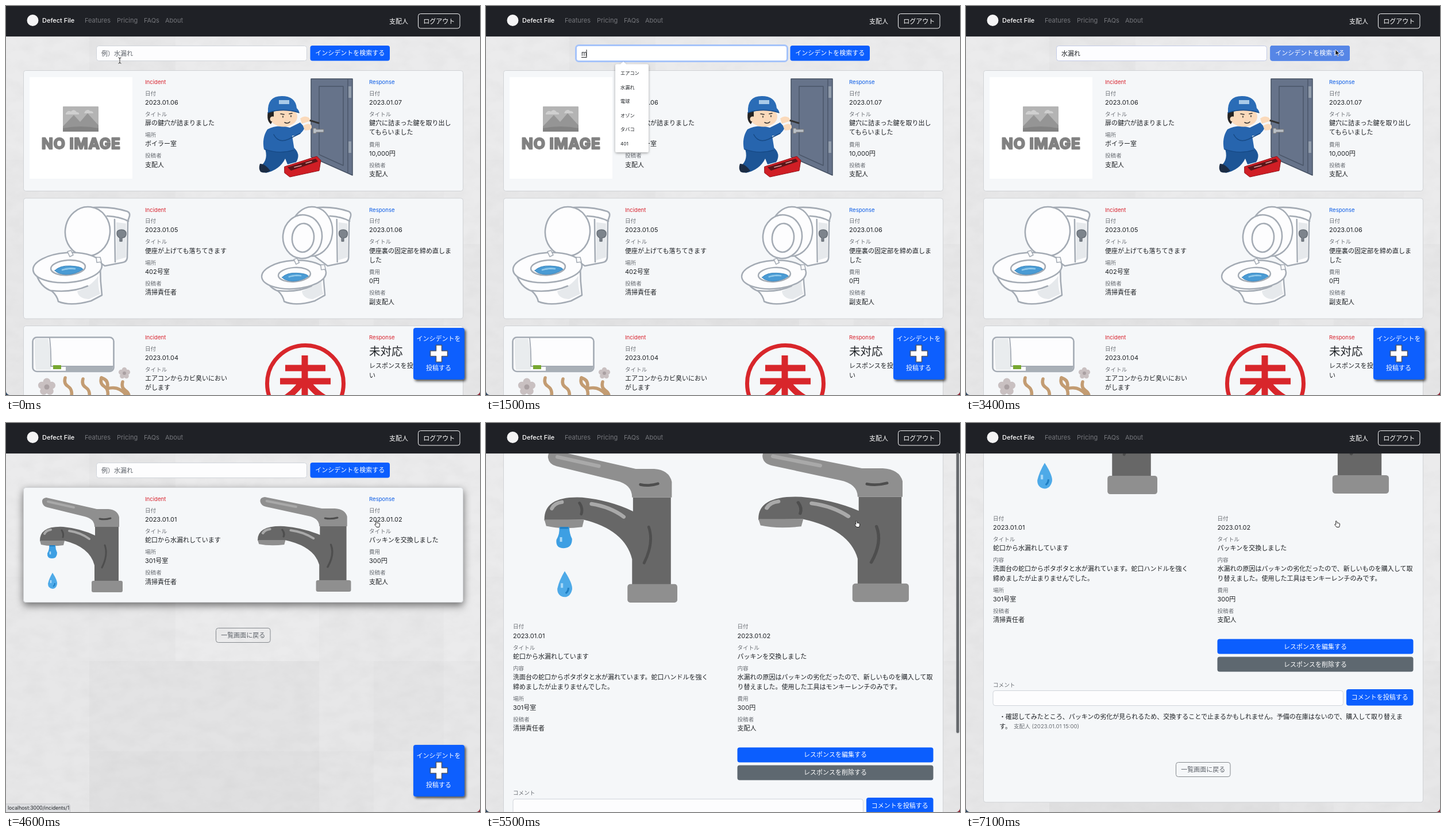
Write an HTML page that moves like this. It is 825 by 678 pixels and loops after 7200 ms.

```html
<!DOCTYPE html>
<html lang="ja">
<head>
<meta charset="utf-8">
<title>Defect File</title>
<style>
@property --s { syntax: '<number>'; inherits: true; initial-value: 0; }
html, body { margin: 0; height: 100%; overflow: hidden; background: #e6e6e7; }
svg { position: absolute; left: 0; top: 0; width: 825px; height: 678px; }
#bg { will-change: transform; }
text { font: 11px Inter, "Noto Sans CJK JP", "Noto Sans CJK", sans-serif; fill: #1d2024; white-space: pre; }
.lab { font-size: 9.6px; fill: #6a6e74; }
.red { font-size: 9.6px; fill: #d8232e; }
.blue { font-size: 9.6px; fill: #0b5ce6; }
.big { font-size: 19.5px; }
.opt { font-size: 8.2px; }
.ph { fill: #5c6168; }
.nav { fill: #74767b; }
.w { fill: #fff; font-weight: 500; }
.mid { text-anchor: middle; }
.card { fill: #f5f7f9; stroke: #d0d2d5; }
.field { fill: #fdfdfe; stroke: #d0d4da; }
.btn { fill: #0b5efe; }
.grey { fill: #5e6870; }
.line { fill: none; stroke: #85898e; }
.art { stroke-linecap: round; stroke-linejoin: round; }
.china { fill: #fdfdfe; stroke: #a4abb4; stroke-width: 2.6; }
.none { font-size: 26px; font-weight: 700; letter-spacing: .8px; fill: #828282; stroke: #828282; stroke-width: 2.4; stroke-linejoin: round; }

#ui { animation: scroll 7.2s infinite; }
#detail { transform: translateY(calc((260 - var(--s)) * 1px)); }
#bar { transform: translateY(calc(var(--s) * .723px)); animation: bar 7.2s linear infinite; }
#lift { filter: drop-shadow(0 5px 7px #0008); animation: lift 7.2s linear infinite; }
#pointer { animation: move 7.2s infinite; }
@keyframes scroll {
  0%, 72.9% { --s: 0; animation-timing-function: cubic-bezier(.5, 0, .8, .6); }
  76.39% { --s: 70.5; animation-timing-function: cubic-bezier(.3, .4, .6, .95); }
  81.94% { --s: 256; animation-timing-function: ease-out; }
  84.7%, 100% { --s: 260; }
}
@keyframes bar {
  0%, 72.5% { opacity: 0; }
  73.5%, 93% { opacity: 1; }
  96%, 100% { opacity: 0; }
}
@keyframes lift {
  0%, 54.8% { opacity: 0; }
  58.5%, 100% { opacity: 1; }
}
@keyframes move {
  0%, 3% { transform: translate(198px, 95px); }
  8.5%, 39.6% { transform: translate(198px, 84px); }
  45%, 52% { transform: translate(643px, 76px); }
  56.5%, 100% { transform: translate(642px, 170px); }
}
</style>
</head>
<body>
<svg id="bg" viewBox="0 0 825 678">
  <filter id="grain" x="0" y="0" width="100%" height="100%">
    <feTurbulence type="fractalNoise" baseFrequency=".03 .05" numOctaves="4" seed="4"/>
    <feColorMatrix values="0 0 0 0 .2  0 0 0 0 .2  0 0 0 0 .2  .09 0 0 0 -.03"/>
  </filter>
  <rect width="825" height="678" fill="#ebebec"/>
  <g fill="#000">
    <path d="M145 53h150v362h-150z" opacity=".015"/>
    <path d="M0 268h145v147h-145zM545 268h95v147h-95z" opacity=".01"/>
    <path d="M0 415h825v263h-825z" opacity=".014"/>
    <path d="M145 415h400v263h-400z" opacity=".016"/>
    <path d="M145 572h495v106h-495zM640 320h122v252h-122z" opacity=".01"/>
  </g>
  <rect width="825" height="678" filter="url(#grain)"/>
</svg>

<svg id="ui" viewBox="0 0 825 678">
  <defs>
    <filter id="soft" x="-30%" y="-30%" width="170%" height="170%">
      <feDropShadow dx="2.5" dy="3" stdDeviation="2" flood-opacity=".65"/>
    </filter>
    <filter id="pop" x="-30%" y="-10%" width="160%" height="125%">
      <feDropShadow dx="0" dy="1.5" stdDeviation="2" flood-opacity=".35"/>
    </filter>

    <g id="tap" class="art" fill="none">
      <path fill="#676767" d="M59 206Q58 179 100 181Q130 184 155 196V181H196V276H154V248Q146 216 101 205Z"/>
      <path fill="#8f8f8f" d="M59 205H102L100 213Q78 216 61 212ZM70 130Q62 131 63 138Q64 145 72 147L137 163Q154 167 154 181H197V164Q194 151 178 150H158Z"/>
      <rect x="149" y="275" width="54" height="20" rx="3" fill="#8f8f8f"/>
      <path stroke="#a9a9a9" stroke-width="4" d="M73 137L118 147M110 188Q130 191 145 202M67 193Q70 187 78 186"/>
      <path stroke="#4e4e4e" stroke-width="3" d="M163 167Q172 169 182 166M97 187Q101 193 99 199M172 213Q178 230 167 252"/>
    </g>
    <g id="drops">
      <path fill="#3d9fe3" d="M75 213H86Q86 220 89 226Q89 236 80 236Q71 236 72 227Q76 220 75 213Z"/>
      <path fill="#4eaae8" d="M81 261Q90 275 89 281Q87 289 81 289Q73 288 73 280Q75 271 81 261Z"/>
      <path fill="none" stroke="#a7d8f8" stroke-width="2.5" d="M77 224v5M78 274v5"/>
      <path fill="none" stroke="#1f7fc4" stroke-width="2" d="M76 214h9M85 279q0 4-3 6"/>
    </g>

    <g id="pan" class="art china">
      <path d="M143 352Q180 348 211 358Q216 360 215 366L212 375L211 439Q210 446 203 447L172 453L148 436Z"/>
      <path fill="none" d="M176 366Q197 367 213 375M189 372L190 446"/>
      <path fill="#e6e9ec" stroke="none" d="M192 377L209 379V438L192 443Z"/>
      <path fill="#7d848c" stroke="#656c74" d="M201 390q8 0 8 7t-7 7v6h-4v-6q-5-2-5-8t8-6Z" stroke-width="1.4"/>
      <ellipse cx="142" cy="393" rx="39" ry="43" transform="rotate(7 142 393)"/>
      <path d="M53 468Q60 490 80 497Q89 505 91 515Q112 524 148 514L167 504Q164 480 164 455Z"/>
      <path fill="#e6e9ec" stroke="none" d="M124 497Q148 489 161 470Q159 487 164 502L144 511Q126 510 124 497Z"/>
      <path fill="none" d="M79 496Q115 500 142 488"/>
    </g>
    <g id="bowl" class="art china">
      <ellipse cx="107" cy="456" rx="60" ry="26" transform="rotate(-4 107 456)"/>
      <ellipse cx="108" cy="456" rx="30" ry="13" transform="rotate(-4 108 456)"/>
      <path fill="#4a9bd4" stroke="#3b86bd" stroke-width="1" d="M85 461Q94 452 112 453Q132 454 134 459Q121 468 104 468Q90 467 85 461Z"/>
      <path stroke="#8fc8ea" d="M98 460q10-4 22-2"/>
      <path d="M107 428l6-2 4 8-6 3ZM157 438l7 0 2 8-8 1Z" stroke-width="1.6"/>
    </g>
  </defs>

  <g id="list" data-on="0-3650"></g>
  <g id="result" data-on="3650-5000"></g>
  <g data-on="5000-7200"><g id="detail"></g></g>
  <g id="top"></g>
  <rect id="bar" x="818.5" width="5" height="489" rx="2.5" fill="#65686c"/>
  <path fill="#27405c" d="M0 672Q1 677 6 678H0Z"/>
  <path fill="#8c2433" d="M825 672Q824 677 819 678H825Z"/>
  <g data-on="4150-5000">
    <path fill="#dcdde0" stroke="#c4c5c8" d="M-1 664H108Q111.500 664 111.500 668V679H-1Z"/>
    <text x="3" y="674" style="font-size:8.6px">localhost:3000/incidents/1</text>
  </g>

  <g id="pointer">
    <path data-on="0-1400 2850-3100" fill="none" stroke="#fff" stroke-width="2.4" d="M-2-5L0-4L2-5M0-4V4M-2 5L0 4L2 5"/>
    <path data-on="0-1400 2850-3100" fill="none" stroke="#222" d="M-2.500-5Q0-5 0-3.500Q0-5 2.500-5M0-4V4M-2.500 5Q0 5 0 3.500Q0 5 2.500 5"/>
    <path data-on="3350-3960" fill="#111" stroke="#fff" stroke-width=".8" d="M0 0V10L2.400 8L4 11.500L5.600 10.800L4 7.300H7.200Z"/>
    <path data-on="3100-3350 3960-7200" fill="#fff" stroke="#222" stroke-width="1" stroke-linejoin="round" d="M1.500 1Q2.700 0 3.300 1.500L4.200 4.200Q7.500 4 8.500 5.500Q9 8 7.500 11.500H3Q1.500 9 -.5 7Q.2 5.600 2 6.700Z"/>
  </g>
</svg>

<script>
const LOOP = 7200, $ = id => document.getElementById(id);
const text = (x, y, s, cls = '') => `<text x="${x}" y="${y}" class="${cls}">${s}</text>`;
const box = (x, y, w, h, cls, rx = 4) => `<rect x="${x}" y="${y}" width="${w}" height="${h}" rx="${rx}" class="${cls}"/>`;
const button = (x, y, w, h, s, cls = 'btn', ink = 'w') =>
  box(x, y, w, h, cls) + text(x + w / 2, y + h / 2 + 4, s, ink + ' mid');
const backButton = y => button(365.5, y, 94.5, 25, '一覧画面に戻る', 'line', 'ph');
const use = (id, m = '') => `<use href="#${id}" transform="${m}"/>`;
const card = (y, h) => box(30.5, y, 765, h, 'card');

// Stacked label/value pairs; y is the middle of the first label
function fields(x, y, rows) {
  return rows.map(([label, ...lines]) => {
    let out = text(x, y + 3.5, label, 'lab');
    lines.forEach((s, i) => out += text(x, y + 19.7 + i * 16.4, s));
    y += 36.3 + (lines.length - 1) * 16.4;
    return out;
  }).join('');
}
const incident = (y, date, title, place, by) => text(242, y + 24, 'Incident', 'red') +
  fields(242, y + 40, [['日付', date], ['タイトル', ...title], ['場所', place], ['投稿者', by]]);
const response = (y, date, title, cost, by) => text(632, y + 24, 'Response', 'blue') +
  fields(632, y + 40, [['日付', date], ['タイトル', ...title], ['費用', cost], ['投稿者', by]]);

const noImage = `<path fill="#fff" d="M41 124H220V301H41Z"/>
  <rect x="99" y="175" width="62" height="44" rx="1" fill="#b4b4b4"/>
  <path fill="#cfcfcf" d="M104 187q4-6 9-3q5-6 10 1q5 0 4 4h-23ZM138 183q5-4 8 0q6 0 6 4h-16Z"/>
  <path fill="#959595" d="M99 210L118 190L129 202L142 187L161 208V219H99Z"/>
  <path fill="#838383" d="M99 213Q130 207 161 213V219H99Z"/>` + text(130.8, 249, 'NO IMAGE', 'none mid');

const worker = `<g class="art">
  <path fill="#66738a" stroke="#465163" stroke-width="1.500" d="M531 127H603V295L531 263Z"/>
  <path fill="none" stroke="#4b576a" stroke-width="1.500" d="M545 140H587V278L545 259ZM595 128V290"/>
  <path fill="#929dac" d="M596 140h5v20h-5ZM596 236h5v20h-5Z"/>
  <path fill="#b9bfc6" stroke="#777" d="M535 213h5v2h13v5h-13v2h-5Z"/>
  <path fill="#1d5596" d="M450 246H500Q514 258 505 272L490 276L486 266Q476 286 452 291L443 279Q458 268 450 246Z"/>
  <path fill="#1b2c44" d="M442 275Q450 274 460 287Q452 293 443 289Q439 283 442 275Z"/>
  <path fill="#2765ae" d="M455 215Q473 206 494 212L512 203L520 212Q513 227 498 226L502 251Q475 260 449 250Q445 230 455 215Z"/>
  <path fill="none" stroke="#174a86" stroke-width="1.500" d="M466 224Q474 240 492 232L512 222M451 250Q476 259 501 251"/>
  <ellipse cx="483" cy="193" rx="24" ry="17.500" fill="#fbdabb"/>
  <path fill="#252322" d="M456 184Q453 200 461 206L466 196V184Z"/>
  <circle cx="464" cy="197" r="4.500" fill="#fbdabb"/>
  <path fill="#2a6cb6" d="M456 186Q454 157 480 157Q504 157 506 178Q511 183 510 186Q482 178 456 186Z"/>
  <path fill="none" stroke="#174a86" stroke-width="1.500" d="M456 186Q482 177 510 186"/>
  <path fill="#a8cae8" d="M475 164h18v7h-18Z"/>
  <path fill="none" stroke="#333" stroke-width="1.600" d="M478 188l6 1M493 188l5-1M482 192v2M496 191v2M485 203q5 3 9-1"/>
  <path stroke="#333" stroke-width="3" d="M524 198L544 204"/>
  <path fill="#fbdabb" d="M512 196q7-6 14-2q5 3 2 7l-13 4ZM517 209q8-6 14-2q3 5-2 9l-9 1Z"/>
  <path fill="#d01e25" stroke="#951219" d="M485 280L541 262L548 269L545 287L494 298L485 291Z"/>
  <path fill="#5b1518" d="M490 281L539 266L543 271L496 287Z"/>
  <path stroke="#d9a5a5" stroke-width="1.500" d="M502 281l12-3M522 274l10-3"/></g>`;

const puff = (x, y, r) => [0, 1, 2, 3, 4].map(i =>
  `<circle cx="${x + r * Math.sin(i * 1.257)}" cy="${y - r * Math.cos(i * 1.257)}" r="${r * .72}"/>`).join('');
const cooler = `<g class="art">
  <rect x="46.500" y="577.500" width="141" height="59.500" rx="7" class="china"/>
  <path fill="#e9ecee" d="M50 580H73Q79 605 78 634H52Q49 610 50 580Z"/>
  <path fill="#a9b0b7" d="M104 629H186Q186 637 181 637H104Z"/>
  <path fill="none" stroke="#a4abb4" stroke-width="1.800" d="M76 578Q79 605 78 628H186"/>
  <rect x="82" y="626" width="14" height="7" fill="#78a832"/>
  <g fill="none" stroke="#c39c72" stroke-width="5.500">${[[103, 648], [134, 650], [166, 648], [203, 655]].map(([x, y]) =>
    `<path d="M${x} ${y}q-3 10 5 15t6 18"/>`).join('')}<path d="M166 648Q180 652 176 667Q196 661 209 678"/></g>
  <g fill="#c9c0c1">${puff(206, 640, 6)}${puff(71, 664, 9)}</g>
  <g fill="#aaa0a2"><circle cx="206" cy="640" r="3"/><circle cx="71" cy="664" r="4.500"/></g></g>`;

const stamp = `<g fill="none" stroke="#d8262b"><circle cx="521" cy="658" r="66.500" stroke-width="7"/>
  <path stroke-width="11" d="M486 631H556M477 654H565M520 609V690M514 657Q502 675 479 688M526 657Q538 675 563 688"/></g>`;

const raised = `<g class="china"><ellipse cx="516" cy="402" rx="34" ry="38" transform="rotate(6 516 402)"/>
  <ellipse cx="517" cy="404" rx="19" ry="25" transform="rotate(6 517 404)"/></g>`;
const narrow = 'matrix(.935 0 0 1 399 0)';

$('list').innerHTML = card(112.5, 210) + noImage + worker +
  incident(112, '2023.01.06', ['扉の鍵穴が詰まりました'], 'ボイラー室', '支配人') +
  response(112, '2023.01.07', ['鍵穴に詰まった鍵を取り出し', 'てもらいました'], '10,000円', '支配人') +
  card(335, 210) + use('pan') + use('bowl') + use('pan', narrow) + raised + use('bowl', 'matrix(.935 0 0 .95 401 35)') +
  incident(334.5, '2023.01.05', ['便座が上げても落ちてきます'], '402号室', '清掃責任者') +
  response(334.5, '2023.01.06', ['便座裏の固定部を締め直しま', 'した'], '0円', '副支配人') +
  card(557.5, 210) + cooler + stamp +
  incident(557, '2023.01.04', ['エアコンからカビ臭いにおい', 'がします'], '', '') +
  text(632, 581, 'Response', 'red') + text(632, 609, '未対応', 'big') +
  text(632, 631, 'レスポンスを投稿してくださ') + text(632, 647.5, 'い');

$('result').innerHTML = `<g id="lift">${card(112.5, 200)}</g>` + card(112.5, 200) +
  use('tap') + use('drops') + use('tap', 'matrix(1.128 0 0 1 371.5 -1)') +
  incident(112, '2023.01.01', ['蛇口から水漏れしています'], '301号室', '清掃責任者') +
  response(112, '2023.01.02', ['パッキンを交換しました'], '300円', '支配人') + backButton(357.5);

const tapL = 'matrix(1.607 0 0 1.607 6.8 -350)';
$('detail').innerHTML = card(-190.5, 851.5) +
  text(47, -166, 'Incident', 'red') + text(437.5, -166, 'Response', 'blue') +
  use('tap', tapL) + use('drops', tapL) + use('tap', 'matrix(1.818 0 0 1.607 366.9 -351)') +
  fields(47, 166, [['日付', '2023.01.01'], ['タイトル', '蛇口から水漏れしています'],
    ['内容', '洗面台の蛇口からポタポタと水が漏れています。蛇口ハンドルを強く', '締めましたが止まりませんでした。'],
    ['場所', '301号室'], ['投稿者', '清掃責任者']]) +
  fields(437.5, 166, [['日付', '2023.01.02'], ['タイトル', 'パッキンを交換しました'],
    ['内容', '水漏れの原因はパッキンの劣化だったので、新しいものを購入して取', 'り替えました。使用した工具はモンキーレンチのみです。'],
    ['費用', '300円'], ['投稿者', '支配人']]) +
  button(437.5, 376.5, 341, 26, 'レスポンスを編集する') + button(437.5, 407.5, 341, 26, 'レスポンスを削除する', 'grey') +
  text(47, 459.5, 'コメント', 'lab') + box(47, 466.5, 609.5, 26, 'field') + button(662, 464, 116.5, 28.5, 'コメントを投稿する') +
  text(58, 516, '・確認してみたところ、パッキンの劣化が見られるため、交換することで止まるかもしれません。予備の在庫はないので、購入して取り替えま') +
  text(58, 532.5, 'す。') + text(83, 532, '支配人 (2023.01.01 15:00)', 'lab') + backButton(591.5);

// Text composed in the search field: start, end, text, caret x
const typed = [[1450, 1600, 'm', 175], [1600, 1750, 'み', 177], [1750, 1870, 'みz', 183], [1870, 2000, 'みず', 188],
  [2000, 2100, 'みずm', 198], [2100, 2220, 'みずも', 199], [2220, 2320, 'みずもr', 203], [2320, 2520, 'みずもれ', 210],
  [2520, 2800, '水漏れ', 199]];
const search = box(157.5, 69.5, 366, 26, 'field') +
  `<rect data-on="700-3300" x="156.500" y="68.500" width="368" height="28" rx="5" fill="#fff" stroke="#a5c3fa" stroke-width="3"/>
   <rect data-on="3300-3650" x="157.500" y="69.500" width="366" height="26" rx="4" fill="#fdfdff" stroke="#c3cbe6"/>
   <g data-on="0-1450 3650-5000">${text(166, 86.5, '例）水漏れ', 'ph')}</g>` +
  typed.map(([a, b, s, x]) => `<g data-on="${a}-${b}">${text(166, 86.5, s)}
    <path stroke="#222" d="M166 89.500H${x}M${x} 76V90"/></g>`).join('') +
  `<g data-on="2800-3650">${text(166, 86.5, '水漏れ')}</g>` +
  button(529.5, 69, 138.5, 26.5, 'インシデントを検索する') +
  `<g data-on="3350-3650"><rect x="529.500" y="69" width="138.500" height="26.500" rx="4" fill="#5686e6"/>
   ${text(598.75, 86.25, 'インシデントを検索する', 'w mid')}</g>`;

const menu = `<g data-on="900-1700"><path filter="url(#pop)" fill="#fff" d="M228 101.500H234L239 97L244 101.500H280Q283 101.500 283 104.500V252Q283 255 280 255H228Q225 255 225 252V104.500Q225 101.500 228 101.500Z"/>
  ${['エアコン', '水漏れ', '電球', 'オゾン', 'タバコ', '401'].map((s, i) => text(234, 120 + i * 24.6, s, 'opt')).join('')}</g>`;

const post = `<rect x="709" y="561" width="89" height="90" rx="4" class="btn" filter="url(#soft)"/>` +
  text(753, 584, 'インシデントを', 'w mid') + text(753, 635, '投稿する', 'w mid') +
  `<path fill="#fff" stroke="#4b5568" stroke-width="1.500" stroke-linejoin="round" d="M748.500 591h10v10h10v9.500h-10v10h-10v-10h-10v-9.500h10Z"/>`;

const navBar = `<rect y="53" width="825" height="1" fill="#0002"/><rect width="825" height="53" fill="#1f2126"/>
  <circle cx="46.500" cy="25" r="10" fill="#f4f4f5"/>` + text(63, 29, 'Defect File', 'w') +
  [[137, 'Features'], [193, 'Pricing'], [240, 'FAQs'], [277, 'About']].map(([x, s]) => text(x, 29, s, 'nav')).join('') +
  text(667, 30.5, '支配人', 'w') +
  `<rect x="717.500" y="13.500" width="72.500" height="25.500" rx="4" fill="none" stroke="#f4f4f5"/>` +
  text(753.75, 30.5, 'ログアウト', 'w mid');

$('top').innerHTML = `<g data-on="0-5000">${search}${menu}${post}</g>` + navBar;

// Turn each data-on="from-to ..." into stepped keyframes
let css = '';
document.querySelectorAll('[data-on]').forEach((el, i) => {
  const steps = el.dataset.on.split(' ').map(span => {
    const [a, b] = span.split('-').map(ms => (ms / LOOP * 100).toFixed(3));
    return `${a}%{opacity:1}${b}%{opacity:0}`;
  }).join('');
  css += `@keyframes on${i}{0%{opacity:0}${steps}100%{opacity:0}}`;
  el.style.animation = `on${i} ${LOOP}ms step-end infinite`;
});
document.head.append(Object.assign(document.createElement('style'), { textContent: css }));
</script>
</body>
</html>
```
